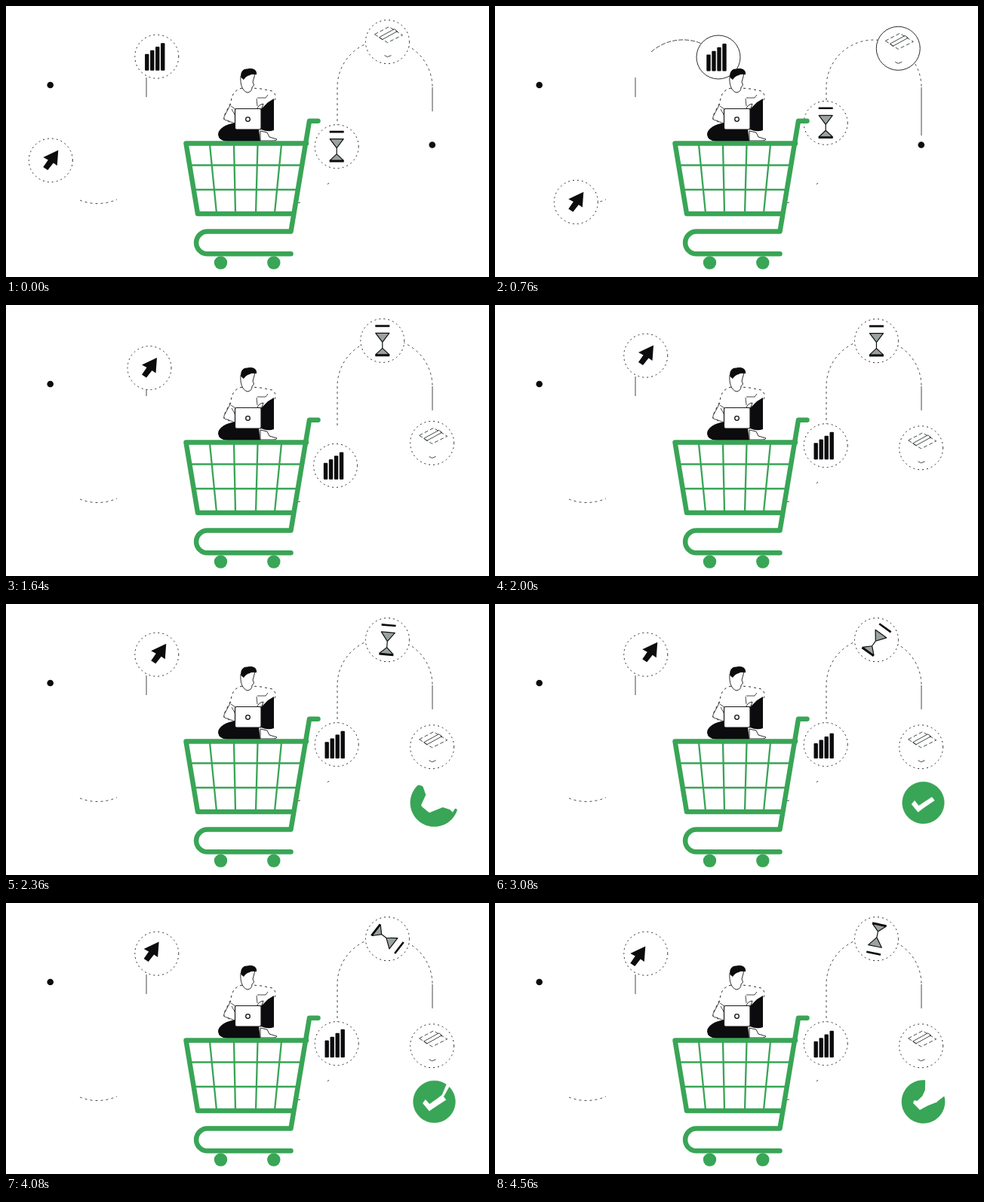
These frames come from a looping animation (640x360 px, 4600 ms). An HTML page:

```html
<!DOCTYPE html>
<html lang="en">
<head>
<meta charset="utf-8">
<title>Shopping cart journey</title>
<style>
html, body { margin: 0; width: 100%; height: 100%; overflow: hidden; background: #fff; }
svg { display: block; width: 100%; height: 100%; }
.thin { fill: none; stroke: #141c1a; stroke-width: .8; }
.ring { fill: #fff; stroke: #141414; stroke-width: .9; }
.ink { fill: #0c0c0e; }
.skin { fill: #fff; stroke: #161616; stroke-width: .9; stroke-linejoin: round; }
.cart { fill: none; stroke: #39a556; stroke-linecap: round; stroke-linejoin: round; }
.green { fill: #39a556; }
</style>
</head>
<body>
<svg viewBox="0 0 640 360" xmlns="http://www.w3.org/2000/svg">
  <g class="thin" stroke-dasharray="3 4">
    <path d="M98 258A63 63 0 0 0 147 257"/>
    <path d="M387 261.5L392 260.5M426 237L428 235"/>
    <path d="M439 160V108A63 63 0 0 1 565 108"/>
  </g>
  <path class="thin" d="M186 121V95M565 108V140"/>
  <g id="early" class="thin">
    <path d="M207 61A63 63 0 0 1 276 51" stroke-dasharray="6 2"/>
    <path d="M565 140V172"/>
  </g>
  <circle class="ink" cx="58.7" cy="105" r="4.3"/>
  <circle class="ink" cx="564.8" cy="184.5" r="4.3"/>

  <g id="box">
    <circle class="ring" r="29"/>
    <g class="thin">
      <path d="M-17 -10L2 -20L20 -9L0 1Z" stroke-dasharray="5 3"/>
      <path d="M-11 -6L9 -17L13 -14L-7 -3Z"/>
      <path d="M-4 18L0 20L5 18"/>
    </g>
  </g>
  <g id="glass">
    <circle class="ring" r="29"/>
    <g id="turn">
      <path d="M-9 -10H9L1 1H-1Z M0 10L9 18H-9Z" fill="#9aa39f"/>
      <path d="M-9 -10H9L0 2ZM0 1V10L9 18.5H-9L0 10" fill="none" stroke="#111" stroke-width="1.2" stroke-linejoin="round"/>
      <path d="M-9.5 -19.5H9.5M-9.5 19.5H9.5" stroke="#0c0c0e" stroke-width="2.6"/>
    </g>
  </g>
  <g id="chart">
    <circle class="ring" r="29"/>
    <g id="bars" class="ink"></g>
  </g>
  <g id="pointer">
    <circle class="ring" r="29"/>
    <path id="arrow" class="ink" d="M10 -13.5L8.5 7L3.5 3.5L-4 13L-10 9L-3.5 -.5L-10 -4Z"/>
  </g>

  <g id="person">
    <path class="skin" d="M313 109C303 111 299 118 298 128L289 146Q287 152 293 152L304 160L338 163L340 142L355 127Q360 119 353 113L338 110L327 109Z" stroke-dasharray="3 4"/>
    <path class="skin" d="M311 93C310 104 313 113 320 115Q326 114 326 108L328.5 105L327 101L330 90L318 89Z"/>
    <path class="ink" d="M311.5 95C310 88 314 83 320 83.5C326 82 333 84 332 91Q325 90 323 92Q318 93 315 98Z"/>
    <path class="thin" d="M298 130L289 147Q288 152 293 152L303 156M298 133L304 137M299 137L304 146M333 122L344 122L347 118M332 123L333 133"/>
    <path class="ink" d="M338 137L347 128L355 123V165Q347 168 338 164Z"/>
    <path class="ink" d="M304 155C291 157 281 163 281 171Q282 179 293 180H337L335 164H304Z"/>
    <path class="skin" d="M337 166L346 168L349 174L359 177Q359 179 354 179H337Z"/>
    <path class="skin" d="M333 137Q334 131 341 130L339 136Z"/>
    <rect class="skin" x="303.5" y="136.5" width="34.5" height="27.5" rx="2" style="stroke-width:1.2"/>
    <circle cx="320.5" cy="150.5" r="2.8" fill="#fff" stroke="#111" stroke-width="1.3"/>
  </g>

  <path d="M238 182H398L382 276H254Z" fill="#fff"/>
  <g class="cart">
    <path stroke-width="2.3" d="M243 211.5H392M249 244H386M270 184L279 275M302 184L304 275M333.5 184L331 275M365 184L356 275"/>
    <path stroke-width="6.5" d="M398 182.5H238.5L254 276H380"/>
    <path stroke-width="6.5" d="M413.5 152.8H402L377.5 299.5H267A14.9 14.9 0 0 0 267 329.3H377.5"/>
  </g>
  <circle class="green" cx="284.5" cy="341" r="8.7"/>
  <circle class="green" cx="354.8" cy="341" r="8.7"/>

  <path id="badge" class="green" stroke="#39a556" stroke-linejoin="round"/>
</svg>
<script>
const LOOP = 4600;
const $ = id => document.getElementById(id);
const clamp = x => Math.min(1, Math.max(0, x));
const mix = (a, b, k) => a + (b - a) * k;
const move = (el, x, y, more = "") =>
  el.setAttribute("transform", `translate(${x.toFixed(2)} ${y.toFixed(2)})${more}`);

// Power ease in and out
function ease(u, p) {
  u = clamp(u);
  return u < .5 ? Math.pow(2 * u, p) / 2 : 1 - Math.pow(2 - 2 * u, p) / 2;
}

// Smooth value through [time, value] pairs
function through(keys, t) {
  if (t <= keys[0][0]) return keys[0][1];
  for (let i = 1; i < keys.length; i++) {
    const [t0, a] = keys[i - 1], [t1, b] = keys[i];
    if (t <= t1) {
      const u = (t - t0) / (t1 - t0);
      return mix(a, b, u * u * (3 - 2 * u));
    }
  }
  return keys[keys.length - 1][1];
}

// Winding track: vertical runs joined by half turns; upper turns lean left
const R = 63.2, TOP = 108, LOW = 199, ARC = Math.PI * R, RUN = LOW - TOP;
function track(s) {
  s -= LOW - 105;
  let x = 59;
  let down = true;
  for (;;) {
    if (s <= 0) return [x, down ? LOW + s : TOP - s];
    if (s <= ARC) {
      const a = s / R, cos = Math.cos(a), sin = Math.sin(a);
      const y = down ? LOW + R * sin : TOP - (60.5 + 5 * clamp(cos)) * sin;
      return [x + R - R * cos, y];
    }
    x += 2 * R;
    s -= ARC + RUN;
    down = !down;
    if (x > 560) return [x, LOW + s];
  }
}

// Each rider goes from its own stop to the next one
const STOPS = [100, 427, 884, 1066, 1243];
const riders = ["pointer", "chart", "glass", "box"].map((id, i) => ({
  el: $(id), ring: $(id).firstElementChild,
  from: STOPS[i], to: STOPS[i + 1],
  delay: i < 2 ? 35 : 60, power: i < 2 ? 2.3 : 3,
  bold: id === "chart" || id === "box"
}));

const bars = [0, 1, 2, 3].map(i => {
  const r = document.createElementNS("http://www.w3.org/2000/svg", "rect");
  r.setAttribute("x", -15.7 + 7 * i);
  r.setAttribute("width", 5.4);
  r.setAttribute("rx", 1);
  $("bars").append(r);
  return r;
});

const barKeys = [[2300, 1], [3080, .92], [3640, 1.07], [4600, .97]];
const arrowX = [[1900, 0], [2360, 2.5], [3080, 5.5], [3640, -4.5], [4600, -10.5]];
const arrowY = [[1900, 0], [2360, -1], [3080, -3], [3640, -7], [4600, 4]];
const badgeKeys = [[2100, 0], [2360, -.25], [2800, 1], [3200, 1], [3560, 0],
  [3760, 0], [4150, 1], [4400, 1], [4600, .4]];

// Inner edge of the badge: handset against tick
const handset = [[26, 7], [23, 4], [13, 4], [-3, 11], [-13, 2], [-14, -2], [-10, -7], [-6, -13], [-7, -22]];
const tick = [[11.5, -8], [15.5, -3], [-.5, 8], [-7, 13], [-16, 2], [-11.5, -3.5], [-6, 3.5], [3, -2.5], [11.5, -8]];

function drawBadge(t) {
  const k = through(badgeKeys, t), size = clamp((t - 2000) / 220);
  const wide = Math.max(0, -k);
  const w = Math.max(.6, 3 * (1 - k));
  const r = 29.5 - 1.5 * k + 8 * wide - w / 2;
  const first = mix(-117, -50, k), last = mix(19, -50, k + wide);
  const sweep = 360 - (last - first);
  const pts = [];
  for (let i = 0; i <= 48; i++) {
    const a = (first - sweep * i / 48) * Math.PI / 180;
    pts.push([r * Math.cos(a), r * Math.sin(a)]);
  }
  // The overshoot opens the handset away from its upper right
  handset.forEach(([x, y], i) =>
    pts.push([mix(x, tick[i][0], k) - 20 * wide, mix(y, tick[i][1], k) + 20 * wide]));
  const el = $("badge");
  el.setAttribute("d", "M" + pts.map(p => p.map(v => v.toFixed(2)).join(" ")).join("L") + "Z");
  el.setAttribute("stroke-width", w.toFixed(2));
  el.setAttribute("visibility", size > 0 ? "visible" : "hidden");
  move(el, 567.5, 264, ` scale(${size.toFixed(3)})`);
}

function draw(t) {
  const early = t > 350 && t < 1300;
  for (const m of riders) {
    const [x, y] = track(mix(m.from, m.to, ease((t - m.delay) / 2000, m.power)));
    move(m.el, x, y);
    m.ring.setAttribute("stroke-dasharray", m.bold && early ? "none" : "2 4");
  }
  $("early").setAttribute("visibility", early ? "visible" : "hidden");

  const grow = through(barKeys, t);
  bars.forEach((b, i) => {
    const h = (22 + 4.8 * i) * grow;
    b.setAttribute("y", (18.5 - h).toFixed(2));
    b.setAttribute("height", h.toFixed(2));
  });

  move($("arrow"), through(arrowX, t), through(arrowY, t));
  const spin = Math.pow(.0053 * Math.max(0, t - 1950), 2);
  $("turn").setAttribute("transform", `rotate(${spin.toFixed(2)})`);
  drawBadge(t);
}

function loop() {
  draw(performance.now() % LOOP);
  requestAnimationFrame(loop);
}
loop();
</script>
</body>
</html>
```
